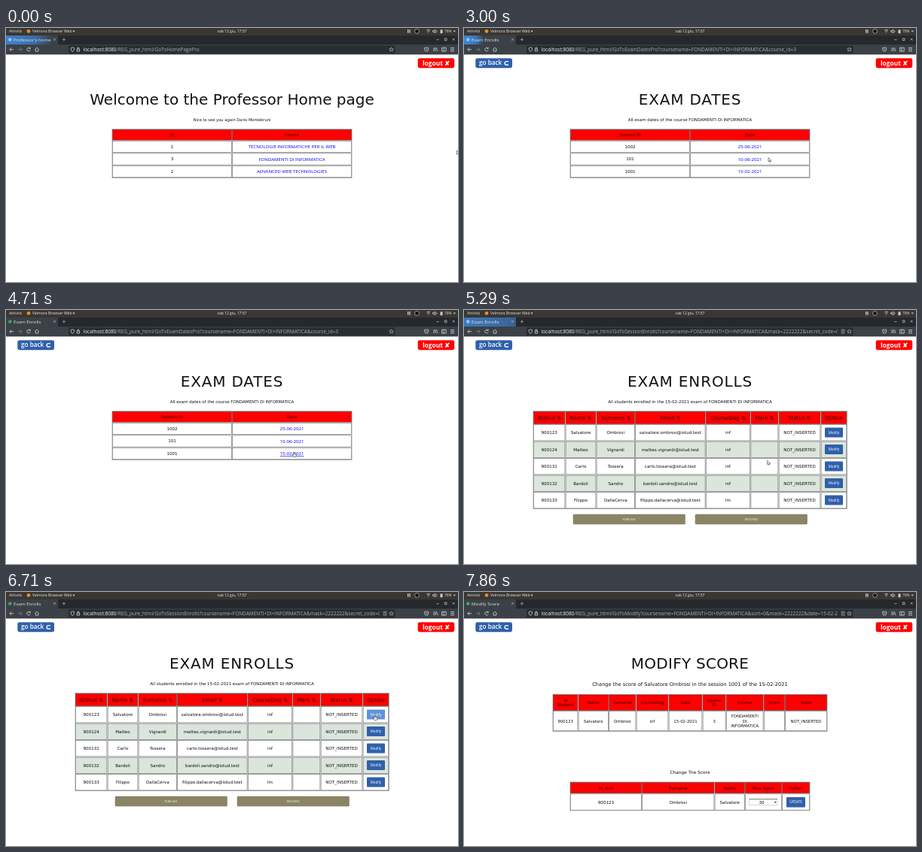
Animation, 600 px wide and 338 px high, one loop 8000 ms. Source, as an HTML page:

```html
<!DOCTYPE html>
<html lang="it">
<head>
<meta charset="utf-8">
<title>Exam desk</title>
<style>
  html, body { margin: 0; width: 100%; height: 100%; overflow: hidden; background: #fff; }
  svg { display: block; width: 100vw; height: 100vh; }
  text { white-space: pre; }
  .wide { font-family: "DejaVu Sans", sans-serif; }
  .ui { font-family: "Open Sans", "Noto Sans", sans-serif; }
  .hot.over text { text-decoration: underline; }
  .hot.button.over text { text-decoration: none; }
  .hot.button.over rect { fill: #6093d8; }
</style>
</head>
<body>
<svg id="stage" viewBox="0 0 600 338"></svg>
<script>
const LOOP = 8000, STEP = 1000 / 7;
const RED = '#ff0000', BLUE = '#3060ab', LINK = '#0000ee', LINE = '#777';

// ---- drawing helpers ----
const rect = (x, y, w, h, fill, extra = '') =>
  `<rect x="${x}" y="${y}" width="${w}" height="${h}" fill="${fill}" ${extra}/>`;
const dot = (x, y, r, fill, extra = '') => `<circle cx="${x}" cy="${y}" r="${r}" fill="${fill}" ${extra}/>`;
const line = (d, color = '#d5d8da', width = .8) =>
  `<path d="${d}" fill="none" stroke="${color}" stroke-width="${width}"/>`;
const text = (x, y, s, size, { font = 'wide', fill = '#111', anchor = 'middle', extra = '' } = {}) =>
  `<text class="${font}" x="${x}" y="${y + size * .36}" font-size="${size}" fill="${fill}" text-anchor="${anchor}" ${extra}>${s}</text>`;
const ui = (x, y, s, size, fill = '#e4e4e2', anchor = 'start', extra = '') =>
  text(x, y, s, size, { font: 'ui', fill, anchor, extra });
const title = (s, spacing = 0) => text(300, 94.6, s, 20, { extra: `letter-spacing="${spacing}"` });
const hot = (x, y, w, h, body, kind = '') =>
  `<g class="hot ${kind}" data-box="${x},${y},${w},${h}">${body}</g>`;
const link = (x, y, s, w) => hot(x - w / 2, y - 4, w, 8, ui(x, y, s, 6.1, LINK, 'middle'));
const button = (x, y, w, h, s) => hot(x, y, w, h,
  rect(x, y, w, h, BLUE, 'rx="1"') + ui(x + w / 2, y + h / 2, s, 4.5, '#fff', 'middle'), 'button');

// cols and rows hold cell edges; cells hold text, markup or line arrays
function table(cols, rows, cells, { head = 5.5, body = 5.6, band = false } = {}) {
  const right = cols.at(-1), bottom = rows.at(-1);
  let out = rect(cols[0], rows[0], right - cols[0], bottom - rows[0], '#fff', `stroke="${LINE}" stroke-width=".6"`);
  cells.forEach((row, r) => row.forEach((cell, c) => {
    const x = cols[c], y = rows[r], w = cols[c + 1] - x, h = rows[r + 1] - y;
    const fill = r === 0 ? RED : band && r % 2 === 0 ? '#dce5dc' : '#fff';
    out += rect(x + .6, y + .6, w - 1.2, h - 1.2, fill, `stroke="${r ? LINE : '#7a3030'}" stroke-width=".7"`);
    if (typeof cell === 'string' && cell.startsWith('<')) { out += cell; return; }
    const lines = [].concat(cell), size = r ? body : head;
    lines.forEach((s, i) => {
      out += text(x + w / 2, y + h / 2 + (i - (lines.length - 1) / 2) * 6.2, s, size, { fill: r ? '#111' : '#300000' });
    });
  }));
  return out;
}

// ---- pages ----
const LIST_COLS = [141, 300, 459], LIST_ROWS = [134.7, 149.7, 166.2, 182.7, 199.3];
const ROW_MID = [158, 174.5, 191];

const listTable = (heads, ids, links, width) => table(LIST_COLS, LIST_ROWS,
  [heads, ...ids.map((id, i) => [id, link(379.5, ROW_MID[i], links[i], [].concat(width)[i] ?? 32)])]);

const homePage = title('Welcome to the Professor Home page') +
  text(300, 122.5, 'Nice to see you again Dario Montebruni', 5.2) +
  listTable(['ID', 'Course'], ['1', '3', '2'],
    ['TECNOLOGIE INFORMATICHE PER IL WEB', 'FONDAMENTI DI INFORMATICA', 'ADVANCED WEB TECHNOLOGIES'], [117, 90, 95]);

const datesPage = title('EXAM DATES', .8) +
  text(300, 122.5, 'All exam dates of the course FONDAMENTI DI INFORMATICA', 5.5) +
  listTable(['Session ID', 'Date'], ['1002', '101', '1001'], ['25-06-2021', '10-06-2021', '15-02-2021'], []);

const students = [
  ['900123', 'Salvatore', 'Ombrosi', 'inf'],
  ['900124', 'Matteo', 'Vignardi', 'inf'],
  ['900131', 'Carlo', 'Tossera', 'inf'],
  ['900132', 'Bardoli', 'Sandro', 'inf'],
  ['900133', 'Filippo', 'DallaCerva', 'lm'],
];
const enrollRows = [134.7, ...Array.from({ length: 6 }, (_, i) => 152 + i * 22.5)];
const enrollsPage = title('EXAM ENROLLS', .85) +
  text(300, 122.5, 'All students enrolled in the 15-02-2021 exam of FONDAMENTI DI INFORMATICA', 5.5) +
  table([92, 134.5, 175.5, 227, 320.7, 380.3, 417.5, 473.5, 508.3], enrollRows, [
    [...['IDStud', 'Name', 'Surname', 'Email', 'CourseDeg', 'Mark', 'Status'].map(s => s + ' ⇅'), 'Option'],
    ...students.map(([id, first, last, degree], i) => [id, first, last,
      `${first}.${last}@istud.test`.toLowerCase(), degree, '', 'NOT_INSERTED',
      button(479, enrollRows[i + 1] + 4.5, 24, 13, 'Modify')]),
  ], { head: 7, band: true }) +
  [['PUBLISH', 145], ['RECORD', 307]].map(([s, x]) =>
    rect(x, 272, 148.5, 13, '#8b8566', 'rx="1" stroke="#777258" stroke-width=".5"') +
    text(x + 74, 278.5, s, 4, { fill: '#f0eee6' })).join('');

const marks = ['', 'absent', 'failed', 'rejected', ...Array.from({ length: 13 }, (_, i) => 18 + i), '30L'];
const MARK_H = 8.25;
const popup = rect(378, 128, 38.5, 149, '#fff', 'stroke="#888" stroke-width=".6"') +
  `<g id="pick" visibility="hidden">${rect(378.3, 128 + 16 * MARK_H, 37.9, MARK_H, '#3584e4')}</g>` +
  marks.map((m, i) => text(395, 128 + (i + .5) * MARK_H, m, 5)).join('');

const scorePage = title('MODIFY SCORE', .25) +
  text(300, 122.7, 'Change the score of Salvatore Ombrosi in the session 1001 of the 15-02-2021', 6.65) +
  table([118, 151.5, 192, 228.5, 271.5, 316.5, 347.7, 397.7, 426, 482], [136.3, 158, 185.3], [
    [['Id', 'Student'], 'Name', 'Surname', 'CourseDeg', 'Date', ['Course', 'ID'], 'Course', 'Score', 'State'],
    ['900123', 'Salvatore', 'Ombrosi', 'inf', '15-02-2021', '3', ['FONDAMENTI', 'DI', 'INFORMATICA'], '', 'NOT_INSERTED'],
  ], { body: 5.4 }) +
  text(300, 239.5, 'Change The Score', 5.8) +
  table([141, 236, 332.5, 373, 422, 459], [253, 268.2, 290.8], [
    ['id_stud', 'Surname', 'Name', 'New Score', 'Option'],
    ['900123', 'Ombrosi', 'Salvatore', '<g/>', button(428, 273, 25, 13.5, 'UPDATE')],
  ]) +
  hot(378, 274.5, 38, 9.5, rect(378.5, 275.5, 37.5, 8, '#fff', 'rx=".6" stroke="#aaa" stroke-width=".5"') +
    line('M378.5 275.7H416', '#555', .7) + '<path d="M411.5 279H415L413.2 281Z" fill="#444"/>') +
  `<g id="chosen">${text(395, 279.6, '30', 5.6)}</g><g id="popup">${popup}</g>`;

const BASE = '/REG_pure_html/GoTo', COURSE = '?coursename=FONDAMENTI+DI+INFORMATICA&amp;';
const pages = [
  { from: 0, tab: "Professor's home", path: 'HomePagePro', body: homePage },
  { from: 21, tab: 'Exam Enrolls', path: `ExamDatesPro${COURSE}course_id=3`, body: datesPage },
  { from: 35, tab: 'Exam Enrolls', path: `SessionEnrolls${COURSE}mask=2222222&amp;secret_code=00&amp;sort=0`, body: enrollsPage },
  { from: 47, tab: 'Modify Score', path: `Modify${COURSE}sort=0&amp;mask=2222222&amp;date=15-02-2021`, body: scorePage },
];

// ---- browser window ----
const topBar = rect(0, 0, 600, 10, '#3a3733') +
  ui(4, 4.3, 'Attività', 5.2) + dot(30, 4.3, 2.4, '#f08a24') + ui(35, 4.3, 'Velmora Browser Web ▾', 5.1) +
  ui(300, 4.3, 'sab 12 giu, 17:57', 5, '#eee', 'middle') +
  rect(533, 2, 1.3, 4.6, '#ccc') + rect(535.3, 2, 1.3, 4.6, '#ccc') +
  dot(545.5, 4.4, 2.9, '#111', 'stroke="#ccc" stroke-width=".7"') +
  line('M558.3 3Q560.6 1.4 563 3M559.3 4.6Q560.6 3.7 562 4.6M560.6 5.6V6.6') +
  line('M566.5 3.6H568L569.7 2V6.8L568 5.2H566.5ZM571 3L572 4.4 571 6') +
  rect(576.5, 2.3, 3, 4.8, '#ccc') + ui(582, 4.3, '76%', 4.8) +
  '<path d="M593.5 3.6H597L595.2 5.6Z" fill="#ccc"/>';

const windowBar = rect(0, 10, 600, 12, '#25292d') + rect(0, 10, 69, 12, '#3b4146') +
  `<g clip-path="url(#tabClip)"><circle id="burst" cx="4" cy="15.5" fill="url(#glow)"/></g>` +
  dot(5.3, 15.5, 2.3, '#3fa564', 'id="icon"') +
  line('M63 13.8L66 16.8M66 13.8L63 16.8M74.8 15.4H79M76.9 13.3V17.5', '#ccc', .6) +
  line('M571.5 15.6H574.5M582.3 13.8H585V16.6H582.3ZM592.8 13.8L595.6 16.6M595.6 13.8L592.8 16.6', '#ccc', .7) +
  rect(0, 22, 600, 13.3, '#3b4146') + rect(83, 23.3, 433.5, 10.8, '#292e32', 'rx="1.2"') +
  line('M10 28.6H5M7.2 26.2L4.8 28.6 7.2 31') +
  line('M16 28.6H21M18.8 26.2L21.2 28.6 18.8 31', '#7d8387') +
  line('M32 27.2A2.3 2.3 0 1 0 32.2 29.4M32.2 25.6V27.4H30.2') +
  line('M38.3 28.6L41 26 43.7 28.6M39.2 28.2V31H42.8V28.2') +
  line('M86.2 26.6L88.3 25.8 90.4 26.6V28.6Q90 30.6 88.3 31.4 86.6 30.6 86.2 28.6Z') +
  line('M94.2 28.2H97.6V31H94.2ZM94.8 28V27A1.1 1.1 0 0 1 97 27V28') +
  line('M511.5 25.8L512.3 27.7 514.3 27.8 512.8 29.1 513.3 31 511.5 30 509.7 31 510.2 29.1 508.7 27.8 510.7 27.7Z', '#ccc', .6) +
  line('M555.7 26.2H560.7V28.5A2.5 2.5 0 0 1 555.7 28.5ZM557 27.8L558.2 29 559.4 27.8') +
  line('M568 26V31M570 26V31M571.4 26.2L573 31') +
  line('M578.6 26.2H584.2V31H578.6ZM581 26.2V31') +
  line('M590 26.5H595M590 28.6H595M590 30.7H595');

const chrome = (p, i) => ui(10, 15.4, p.tab, 6.1) +
  `<g clip-path="url(#urlClip)">${ui(102.5, 28.6, `localhost:8080<tspan fill="#a9adaf">${BASE}${p.path}</tspan>`, 6.5, '#f2f2f2')}</g>` +
  (i > 1 ? line('M501.2 26H505V31.2H501.2ZM502 27.6H504.2M502 29.3H504.2', '#bbb', .6) : '');

const logout = rect(546.7, 40.2, 48.5, 13, RED, 'rx="2.4"') +
  ui(571, 46.6, 'logout ✘', 8.4, '#fff', 'middle', 'font-weight="700"');
const goBack = rect(15.3, 40.2, 48.7, 13, BLUE, 'rx="2.4"') +
  ui(20, 46.4, 'go back', 8.2, '#fff', 'start', 'font-weight="600"') +
  line('M59 44.6H56.2A2 2 0 0 0 56.2 49H59', '#fff', 1.3);

const outline = 'fill="#fff" stroke="#333" stroke-width=".6" stroke-linejoin="round"';
const cursors = `<g id="cursor">
  <path id="arrow" d="M0 0V5.3L1.3 4.2 2.1 6 3 5.6 2.2 3.9H3.9Z" ${outline}/>
  <path id="hand" d="M-.6 .4Q0 -.4 .6 .4V2.4L3.2 3V5L2.5 6.5H-.6L-2.2 3.8 -1.6 3.3 -.6 4.2Z" ${outline}/>
  <path id="beam" d="M-1 -.4H1M0 -.4V5.4M-1 5.4H1" fill="none" stroke="#333" stroke-width=".6"/></g>`;

const stage = document.getElementById('stage');
stage.innerHTML = `<defs>
  <clipPath id="tabClip"><rect y="10" width="69" height="12"/></clipPath>
  <clipPath id="urlClip"><rect x="100" y="23" width="396" height="12"/></clipPath>
  <radialGradient id="glow"><stop offset="0" stop-color="#3f8ae0"/><stop offset=".6" stop-color="#3a72b4"/>
    <stop offset="1" stop-color="#3a72b4" stop-opacity="0"/></radialGradient></defs>` +
  rect(0, 0, 600, 338, '#fff') + topBar + windowBar + logout +
  `<g id="back">${goBack}</g>` +
  pages.map((p, i) => `<g class="page">${chrome(p, i)}${p.body}</g>`).join('') + cursors;

// ---- motion: [step, x, y] of the pointer tip ----
const path = [
  [0, 598.5, 163], [4, 575, 186], [8, 524, 168], [9, 502, 155], [11, 452, 161], [13, 425, 167], [16, 404, 172.5],
  [21, 404, 172.5], [23, 404, 174], [28, 402, 181], [31, 385, 188], [33, 379, 190], [36, 379, 190],
  [39, 450, 221], [40, 487, 229], [42, 490, 205], [44, 489.5, 164], [47, 489.5, 164],
  [52, 396.5, 280.5], [53, 396.5, 280.5], [54, 403, 261.5], [56, 403, 261.5],
];
function pointerAt(step) {
  const i = Math.max(1, path.findIndex(p => p[0] >= step));
  const [a, ax, ay] = path[i - 1], [b, bx, by] = path[i];
  const k = (step - a) / (b - a);
  return [ax + (bx - ax) * k, ay + (by - ay) * k];
}

const $ = id => document.getElementById(id);
const show = (el, on) => el.setAttribute('visibility', on ? 'visible' : 'hidden');
const views = [...document.querySelectorAll('.page')].map(el => ({
  el, hots: [...el.querySelectorAll('.hot')].map(h => ({ h, box: h.dataset.box.split(',').map(Number) })),
}));

function draw(time) {
  const step = Math.floor((time % LOOP + 3) / STEP) % 56;
  const current = pages.findLastIndex(p => step >= p.from);
  const [x, y] = pointerAt(step);
  const open = step === 53 || step === 54;
  let over = false;

  views.forEach(({ el, hots }, i) => {
    el.style.display = i === current ? '' : 'none';
    if (i !== current) return;
    for (const { h, box: [bx, by, w, hh] } of hots) {
      const hit = !open && x >= bx && x <= bx + w && y >= by && y <= by + hh;
      h.classList.toggle('over', hit);
      over ||= hit;
    }
  });

  // glow that spreads over the tab after a page has loaded
  const age = step - (current ? pages[current].from : -1);
  const glowing = age < 5;
  $('burst').setAttribute('r', 22 + age * 36);
  $('burst').setAttribute('opacity', glowing ? 1 - age * .12 : 0);
  $('icon').setAttribute('fill', glowing ? '#8cc4f5' : '#3fa564');

  show($('back'), current > 0);
  show($('popup'), open);
  show($('pick'), step === 54);
  show($('chosen'), step >= 55);
  show($('hand'), over);
  show($('beam'), step >= 55);
  show($('arrow'), !over && step < 55);
  $('cursor').setAttribute('transform', `translate(${x} ${y})`);
}

const start = performance.now();
function tick() {
  draw(performance.now() - start);
  requestAnimationFrame(tick);
}
tick();
</script>
</body>
</html>
```
